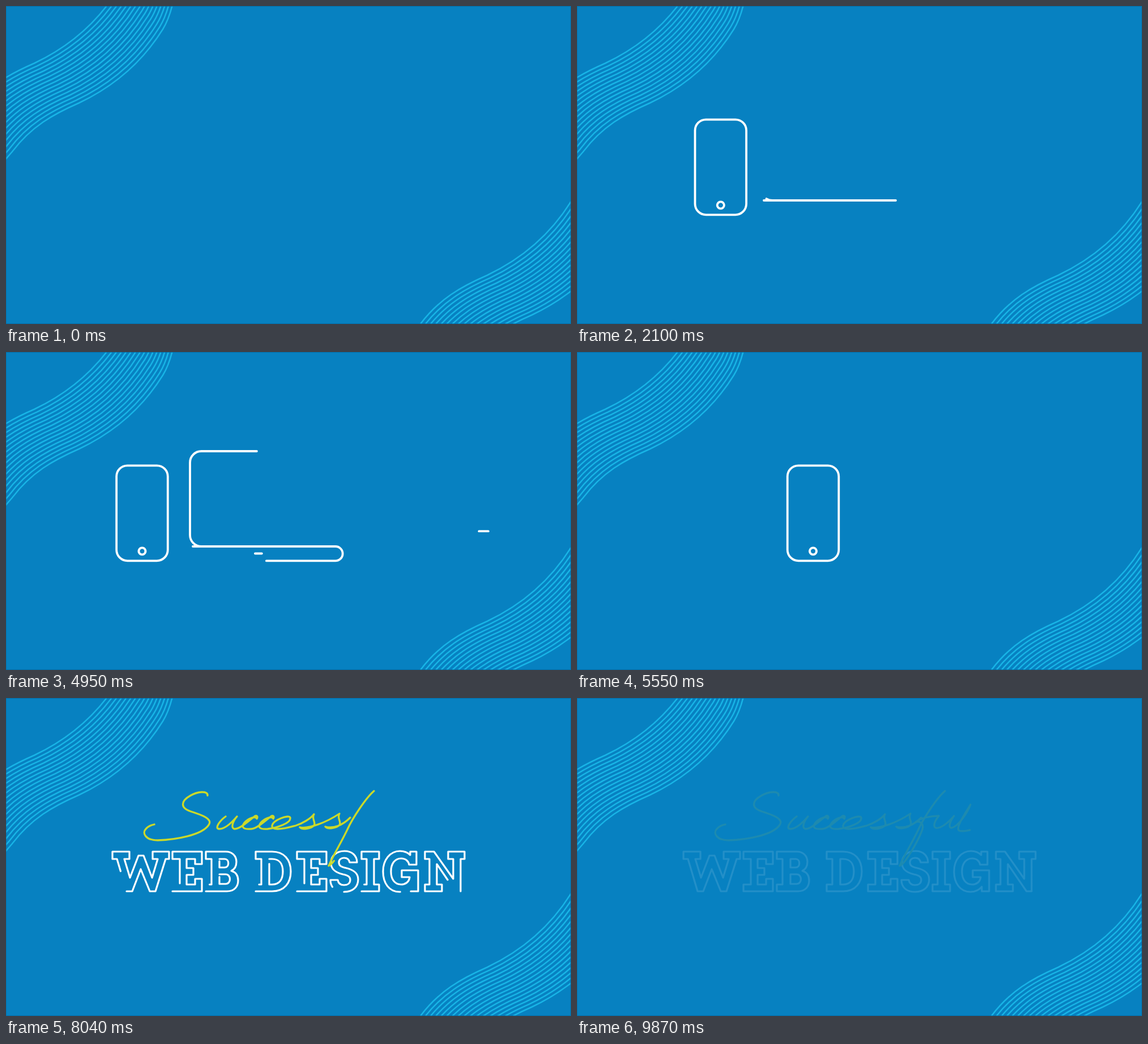
An HTML page for the animation above (9900 ms loop, 998x561 px).

```html
<!DOCTYPE html>
<html lang="en">
<head>
<meta charset="utf-8">
<title>Web design</title>
<style>
  html, body { margin: 0; width: 100%; height: 100%; overflow: hidden; background: #0781c1; }
  svg { display: block; width: 998px; height: 561px; fill: none; stroke-linecap: round; stroke-linejoin: round; }
  .waves { stroke: #18b4e6; stroke-width: 2.5; }
  .white { stroke: #fff; stroke-width: 3.8; }
  #letters { stroke-width: 3.2; }
  .script { stroke: #cbd92a; stroke-width: 3.3; }
</style>
</head>
<body>
<svg viewBox="0 0 998 561">
  <g class="waves" id="topWaves"></g>
  <g class="waves" id="bottomWaves" transform="translate(800 374)"></g>
  <rect x=".5" y=".5" width="997" height="560" stroke="#066ca3"/>
  <g class="white" id="phone"></g>
  <g class="white" id="screens"></g>
  <g id="title">
    <g class="white" id="letters"></g>
    <g class="script" id="script"></g>
  </g>
</svg>
<script>
const LOOP = 9900, STEP = 30, DRAW = 1350, WAVES = 16;
const byId = id => document.getElementById(id);
const clamp = v => Math.min(1, Math.max(0, v));
const easeOut = (u, n) => 1 - (1 - clamp(u)) ** n;

function addPath(parent, d) {
  const path = document.createElementNS('http://www.w3.org/2000/svg', 'path');
  path.setAttribute('d', d);
  byId(parent).append(path);
  return path;
}

function trim(path, amount) {
  path.style.display = amount > 0 ? '' : 'none';
  path.setAttribute('stroke-dasharray', amount < 1 ? `${amount} 2` : 'none');
}

// Timing curve with flat ends: control points (x1, 0) and (x2, 1).
function bezier(u, x1, x2) {
  let lo = 0, hi = 1;
  u = clamp(u);
  for (let i = 0; i < 24; i++) {
    const s = (lo + hi) / 2, r = 1 - s;
    if (3 * r * r * s * x1 + 3 * r * s * s * x2 + s ** 3 < u) lo = s; else hi = s;
  }
  return lo * lo * (3 - 2 * lo);
}

// Waves: one curve repeated along a diagonal.
const wave = 'M215-72Q208-45 198-29C158 35 105 75 50 101C4 121-35 143-68 187Q-76 196-90 213';
for (const group of ['topWaves', 'bottomWaves'])
  for (let i = 0; i < WAVES; i++) {
    const part = i / (WAVES - 1);
    addPath(group, wave).setAttribute('transform', `translate(${79 * part} ${70 * part})`);
  }

// Devices: every line draws itself in and later retracts.
const display = (x, y) => `M${x} ${y}h-218a20 20 0 0 1-20-20v-128a20 20 0 0 1 20-20h218a20 20 0 0 1 20 20v128a20 20 0 0 1-20 20z`;
const devices = [
  ['phone', 'M-26 200.3H26a19.3 19.3 0 0 1 19.3 19.3V349a19.3 19.3 0 0 1-19.3 19.3H-26a19.3 19.3 0 0 1-19.3-19.3V219.6a19.3 19.3 0 0 1 19.3-19.3z', 0, 5759],
  ['phone', 'M0 345.4a6 6 0 1 1-.01 0z', 0, 5759],
  ['screens', 'M330 343H582a12.7 12.7 0 0 1 0 25.4H326.5a12.7 12.7 0 0 1 0-25.4z', 2012, 3846],
  ['screens', display(563, 343), 2028, 3801],
  ['screens', 'M440 355.5H467.5', 2125, 3721],
  ['screens', display(852, 316.2), 2270, 3604.6],
  ['screens', 'M718.7 316V368', 2300, 3500],
  ['screens', 'M767 316V368', 2300, 3500],
  ['screens', 'M702 368.3H784', 2300, 3450]
].map(([parent, d, start, end]) => ({ path: addPath(parent, d), start, end }));

// Title outlines.
const letterE = x => `M${x} 341h52v-22h-12v10h-15v-17h12v-12h-12v-16h15v9h12v-22h-52v13h13v45h-13z`;
const letters = [
  'M213 341H223L238 302L254 341H264L282 284H288V271H259V284H268L258 317L243 278H234L219 317L209 284H218V271H188V284H196Z',
  letterE(294),
  'M353 341H390C404 341 410 332 410 322C410 312 405 307 398 305C404 302 407 297 407 289C407 278 399 271 388 271H353V284H363V329H353Z',
  'M377 284H386C395 284 395 299 386 299H377Z',
  'M377 311H388C398 311 398 328 388 328H377Z',
  'M441 341H470C492 341 503 326 503 306C503 285 491 271 470 271H441V284H451V329H441Z',
  'M465 284H470C483 284 489 293 489 306C489 320 483 329 470 329H465Z',
  letterE(514),
  'M597 342C613 342 622 333 622 320C622 308 613 303 601 300C592 298 588 296 588 290C588 285 592 282 597 282C603 282 606 285 607 290H620C620 278 611 270 598 270C583 270 574 279 574 291C574 303 583 308 595 311C604 313 608 315 608 321C608 327 603 330 597 330C590 330 587 327 586 321H573C573 334 582 342 597 342Z',
  'M628 341H659V329H650V284H659V271H628V284H637V329H628Z',
  'M715 341H728V304H699V316H713C712 325 705 329 698 329C686 329 680 319 680 306C680 292 687 283 698 283C706 283 711 288 712 294H725V271H714V277C709 272 703 270 696 270C678 270 666 286 666 306C666 327 677 342 695 342C703 342 710 339 715 333Z',
  'M803 341V284H810V271H781V284H790V319L756 271H740V284H748V329H740V341H770V329H761V293L794 341Z'
].map(d => addPath('letters', d));

// Handwriting: strokes follow one another.
const c = 'c10 0 28-17 36-23c4-1 5 2 3 5c-2-5-14-2-22 7c-6 8-2 12 12 11';
const s = 'c-5 8 4 14 0 20c-5 6-22 8-25 3';
let scriptLength = 0;
const script = [
  'M356 172C357 163 338 165 326 172C308 182 308 194 326 200C345 206 366 213 358 224C346 242 300 250 268 251C246 251 240 238 247 231C251 226 257 224 262 223',
  `M388 209C378 216 367 231 377 231C388 231 402 216 408 209C401 217 396 230 404 231${c}${c}`
    + `c16-2 42-10 40-20c-2-6-30 4-32 14c-1 8 14 8 42 0c12-4 26-12 32-20${s}c16 3 46-8 70-24${s}c14 4 30-2 44-16`,
  'M650 164C636 176 612 212 603 232C592 255 580 274 570 296C578 295 603 252 610 232C613 222 606 216 598 219C608 211 626 208 639 208',
  'M639 208C628 222 629 231 638 229C648 227 659 216 666 208C657 220 656 230 662 229C674 226 690 202 695 188C684 206 668 230 675 234C680 236 688 234 694 233'
].map(d => {
  const path = addPath('script', d), length = path.getTotalLength(), start = scriptLength;
  scriptLength += length;
  return { path, start, length };
});

for (const path of [...devices.map(p => p.path), ...letters, ...script.map(p => p.path)])
  path.setAttribute('pathLength', 1);

function render(t) {
  for (const { path, start, end } of devices)
    trim(path, t < end ? easeOut((t - start) / DRAW, 6) : 1 - clamp((t - end) / DRAW) ** 6);

  const slide = bezier((t - 1380) / 1245, .39, .075) - bezier((t - 4500) / 1380, .925, .61);
  byId('phone').setAttribute('transform', `translate(${499.2 - 273.9 * slide} 0)`);

  const outline = easeOut((t - 7100) / 1700, 3.3);
  letters.forEach(path => trim(path, outline));

  const written = scriptLength * easeOut((t - 7120) / 1780, 2);
  for (const { path, start, length } of script) trim(path, clamp((written - start) / length));

  byId('title').setAttribute('opacity', clamp((LOOP - t) / 270));
}

function tick() {
  render(Math.floor(performance.now() / STEP) * STEP % LOOP);
  requestAnimationFrame(tick);
}
tick();
</script>
</body>
</html>
```
